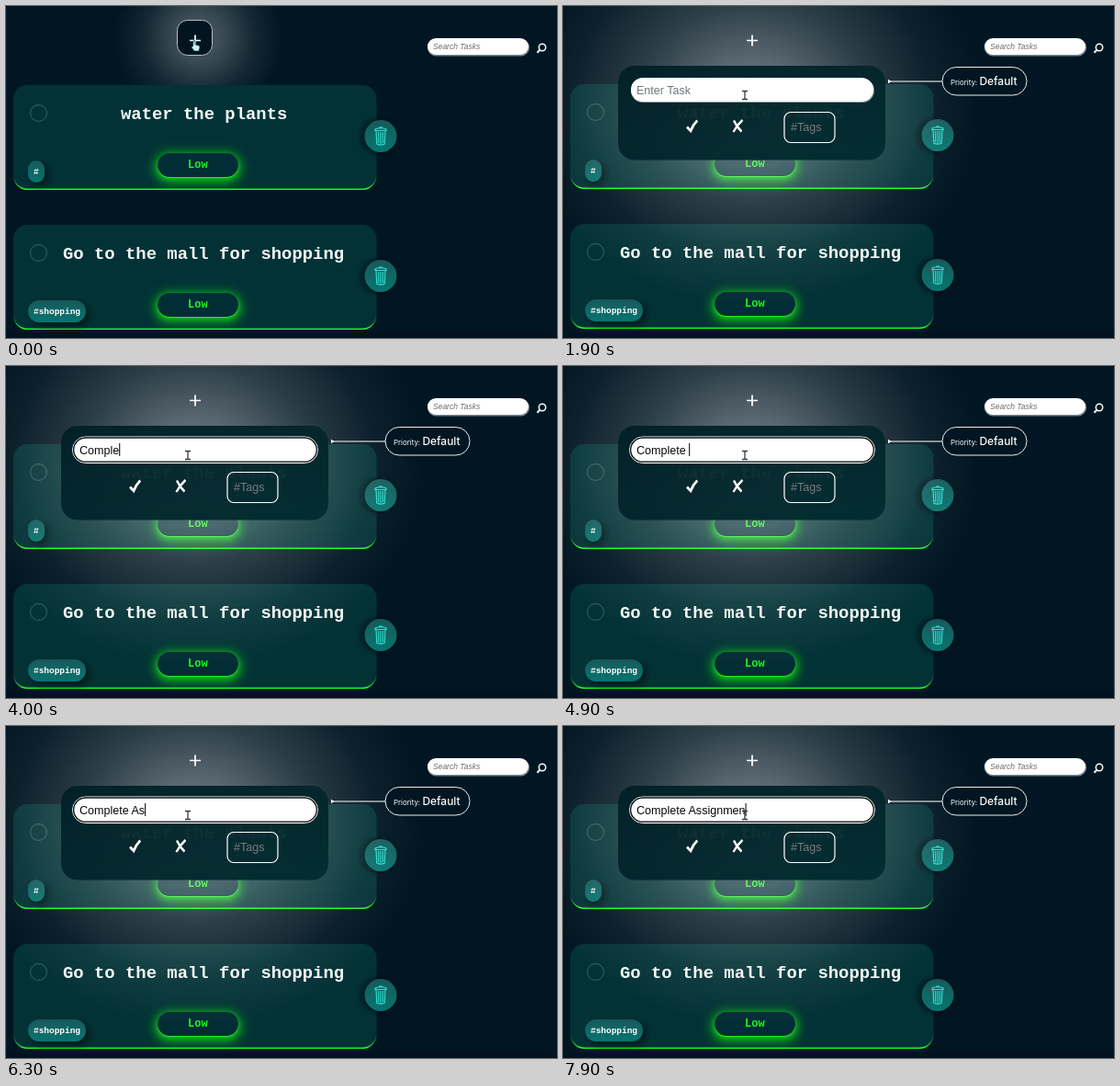
An HTML page that plays this animation: 600x361 px, repeating every 8 s.

```html
<!DOCTYPE html>
<html lang="en">
<head>
<meta charset="utf-8">
<title>Task list</title>
<style>
  html, body { margin: 0; width: 100%; height: 100%; overflow: hidden; background: #011622; }
  svg { display: block; width: 600px; height: 361px; }
  .mono { font-family: "Courier New", "Liberation Mono", monospace; font-weight: bold; }
  .sans { font-family: "Liberation Sans", Arial, sans-serif; }
  .geo { font-family: Poppins, Inter, sans-serif; fill: #fff; }
  .title { font-size: 18.9px; fill: #f4f8f8; }
  .line { fill: none; stroke: #fff; }
</style>
</head>
<body>
<svg viewBox="0 0 600 361">
  <defs>
    <radialGradient id="halo">
      <stop offset="0" stop-color="#d8dce0" stop-opacity=".36"/>
      <stop offset=".3" stop-color="#d8dce0" stop-opacity=".26"/>
      <stop offset=".65" stop-color="#d8dce0" stop-opacity=".09"/>
      <stop offset="1" stop-color="#d8dce0" stop-opacity="0"/>
    </radialGradient>
    <radialGradient id="glow">
      <stop offset="0" stop-color="#fff" stop-opacity=".42"/>
      <stop offset=".2" stop-color="#fff" stop-opacity=".36"/>
      <stop offset=".5" stop-color="#fff" stop-opacity=".17"/>
      <stop offset=".78" stop-color="#fff" stop-opacity=".05"/>
      <stop offset="1" stop-color="#fff" stop-opacity="0"/>
    </radialGradient>
    <linearGradient id="teal" x2="0" y2="1">
      <stop stop-color="#17595a"/><stop offset="1" stop-color="#087570"/>
    </linearGradient>
    <linearGradient id="panelFill" x2="1" y2="1">
      <stop stop-color="#011f26"/><stop offset=".5" stop-color="#02252b"/><stop offset="1" stop-color="#012c30"/>
    </linearGradient>
    <filter id="blur3" x="-50%" y="-80%" width="200%" height="260%"><feGaussianBlur stdDeviation="3"/></filter>
    <filter id="blur6" x="-50%" y="-100%" width="200%" height="300%"><feGaussianBlur stdDeviation="6"/></filter>
  </defs>
  <rect width="600" height="361" fill="#011622"/>
  <rect y="355" width="600" height="6" fill="#02131f"/>

  <circle id="halo-spot" cx="210" cy="34" r="92" fill="url(#halo)"/>
  <g id="cards"></g>
  <rect id="button" x="186.5" y="15.5" width="38" height="38" rx="11" fill="#01141f" stroke="#b4c0c4"/>
  <path class="line" d="M200 37.5h12M206 31.5v12" stroke-width="1.7"/>

  <g fill="#fff">
    <rect x="459" y="36" width="111" height="18.5" rx="9.2" fill="#7d858a"/>
    <rect x="459" y="35" width="110" height="18" rx="9"/>
    <text class="sans" x="465" y="46.5" font-size="8.5" font-style="italic" fill="#6b6b6b">Search Tasks</text>
    <circle class="line" cx="584" cy="45" r="3.7" stroke-width="1.5"/>
    <path class="line" d="M581.4 47.7l-3 3" stroke-width="2"/>
  </g>

  <g id="dialog">
    <ellipse cx="206" cy="106" rx="250" ry="222" fill="url(#glow)"/>
    <rect x="60" y="65" width="291" height="102.5" rx="18" fill="url(#panelFill)" opacity=".95"/>
    <rect x="74" y="79" width="265" height="26" rx="13" fill="#89999b"/>
    <rect x="74" y="78" width="264" height="26" rx="13" fill="#fff"/>
    <g id="focus" fill="none">
      <rect x="72.5" y="77" width="267" height="28.5" rx="14.2" stroke="#fff"/>
      <rect x="73.7" y="78.2" width="264.6" height="26" rx="13" stroke="#101010" stroke-width="1.2"/>
    </g>
    <text id="entry" class="sans" x="80" y="95.6" font-size="12.55" xml:space="preserve"></text>
    <rect id="caret" y="84" width="1" height="14" fill="#000"/>
    <path class="line" d="M135 131.5l4 4.2q2.5-6.5 7.2-11.2" stroke-width="2.7"/>
    <path class="line" d="M186 124.5q3 7 8.5 12M195.5 124q-6 5.5-10 13" stroke-width="2.4"/>
    <rect class="line" x="241" y="115.5" width="55" height="33" rx="7" stroke-width="1.2"/>
    <text class="sans" x="248" y="136.3" font-size="12.55" fill="#757d7e">#Tags</text>
    <path class="line" d="M355 82h58"/>
    <path d="M354 79.8l3.5 2.2-3.5 2.2z" fill="#fff"/>
    <rect x="413" y="66.5" width="92" height="30.5" rx="15.2" fill="#011622" stroke="#e8eeee"/>
    <text class="geo" x="422" y="85.5" font-size="7.9">Priority:</text>
    <text class="geo" x="453.5" y="85.5" font-size="11.9" font-weight="500">Default</text>
  </g>

  <path id="hand" d="M-2 0q1-1.5 2 0v4l4 1q1.2 .5 1 2l-1 4h-5l-3-4q0-1.5 1.5-1z" fill="#c8f6f6" stroke="#12343c" stroke-width=".7"/>
  <path id="beam" d="M-3-4.5h2.2l.8.7.8-.7h2.2M-3 4.5h2.2l.8-.7.8.7h2.2M0-4v8" fill="none" stroke="#333a3d" stroke-width="1.3"/>
</svg>
<script>
const $ = id => document.getElementById(id);

function card(y, title, titleX, tag, tagW) {
  const pill = (extra, dy = 0, grow = 0) => `<rect x="${165 - grow}" y="${74 + dy - grow}"
    width="${88 + 2 * grow}" height="${26 + 2 * grow}" rx="${13 + grow}" ${extra}/>`;
  const label = (extra, d = 0) => `<rect x="${24 + d}" y="${82 + d}" width="${tagW}" height="24" rx="${Math.min(12, tagW / 2)}" ${extra}/>`;
  return `<g transform="translate(0 ${y})">
    <rect x="8" width="395.5" height="113.5" rx="15" fill="#033236"/>
    <path d="M8 97.5a15 16.5 0 0 0 15 16.5H388.5a15 16.5 0 0 0 15-16.5a15 15 0 0 1-15 15H23a15 15 0 0 1-15-15z" fill="#1cf22a"/>
    <circle cx="35.5" cy="30.5" r="9" fill="none" stroke="#285759" stroke-width="1.3"/>
    <text class="mono title" x="${titleX}" y="37">${title}</text>
    ${pill('fill="#0bdc12" opacity=".62" filter="url(#blur6)"', 3, 4)}
    ${pill('fill="#12ee18" opacity=".6" filter="url(#blur3)"', 2)}
    ${pill('fill="#20f51f"', 1)}${pill('fill="#032d36"')}
    <text class="mono" x="198" y="90.3" font-size="12" fill="#1cf51c">Low</text>
    ${label('fill="#001218" opacity=".8" filter="url(#blur3)"', 4)}${label('fill="url(#teal)"')}
    <text class="mono" x="30" y="97" font-size="9.45" fill="#fff">${tag}</text>
    <circle cx="404.5" cy="56" r="17.5" fill="#000d14" opacity=".8" filter="url(#blur3)"/>
    <circle cx="408" cy="55.5" r="17.5" fill="url(#teal)"/>
    <g fill="none" stroke="#2fe0d0">
      <path d="M402 49.5v-1.5q6-2.5 12 0v1.5zM406 46.2h4M403 50l.8 14q4.200 2.4 8.4 0l.8-14" stroke-width="1.2"/>
      <path d="M405.7 51v12M408 51v13M410.3 51v12" stroke-width="1.1"/>
    </g>
  </g>`;
}
$('cards').innerHTML = card(86, 'water the plants', 125, '#', 18) +
  card(238, 'Go to the mall for shopping', 62, '#shopping', 63);

const LOOP = 8000, OPEN = 1000, FOCUS = 2200;
const phrase = 'Complete Assignmen';
const keys = [3000, 3200, 3400, 3600, 3800, 3960, 4200, 4400, 4900,
  6000, 6250, 6500, 6700, 6920, 7150, 7350, 7600, 7820];
const part = (t, a, b) => Math.max(0, Math.min(1, (t - a) / (b - a)));
const ease = p => p * p * (3 - 2 * p);
const show = (id, on) => $(id).style.display = on ? '' : 'none';
const place = (id, x, y) => $(id).setAttribute('transform', `translate(${x} ${y})`);

function draw(t) {
  const typed = keys.filter(k => k <= t).length;
  const lastKey = typed ? keys[typed - 1] : FOCUS;
  const entry = $('entry');
  entry.textContent = typed ? phrase.slice(0, typed) : 'Enter Task';
  entry.setAttribute('fill', typed ? '#080808' : '#70777a');
  $('caret').setAttribute('x', 80 + (typed ? entry.getComputedTextLength() : 0));
  show('caret', t >= FOCUS && (t - lastKey) % 1000 < 500);
  show('focus', t >= FOCUS);
  show('dialog', t >= OPEN);
  show('halo-spot', t < OPEN);

  $('button').style.opacity = 1 - part(t, 1400, 1700);
  place('cards', 0, t < 1500 ? 0 : -1);

  // The pointer drifts on the button, then travels down into the text field.
  const drift = ease(part(t, 100, 900)), down = ease(part(t, 1300, 1900));
  const x = 206 + 2 * drift - 10 * down, y = 38 + 5 * drift + 54 * down;
  const overField = y > 78;
  place('hand', x, y);
  place('beam', 198, y);
  show('hand', !overField);
  show('beam', overField);
}

function tick() {
  draw(performance.now() % LOOP);
  requestAnimationFrame(tick);
}
tick();
</script>
</body>
</html>
```
